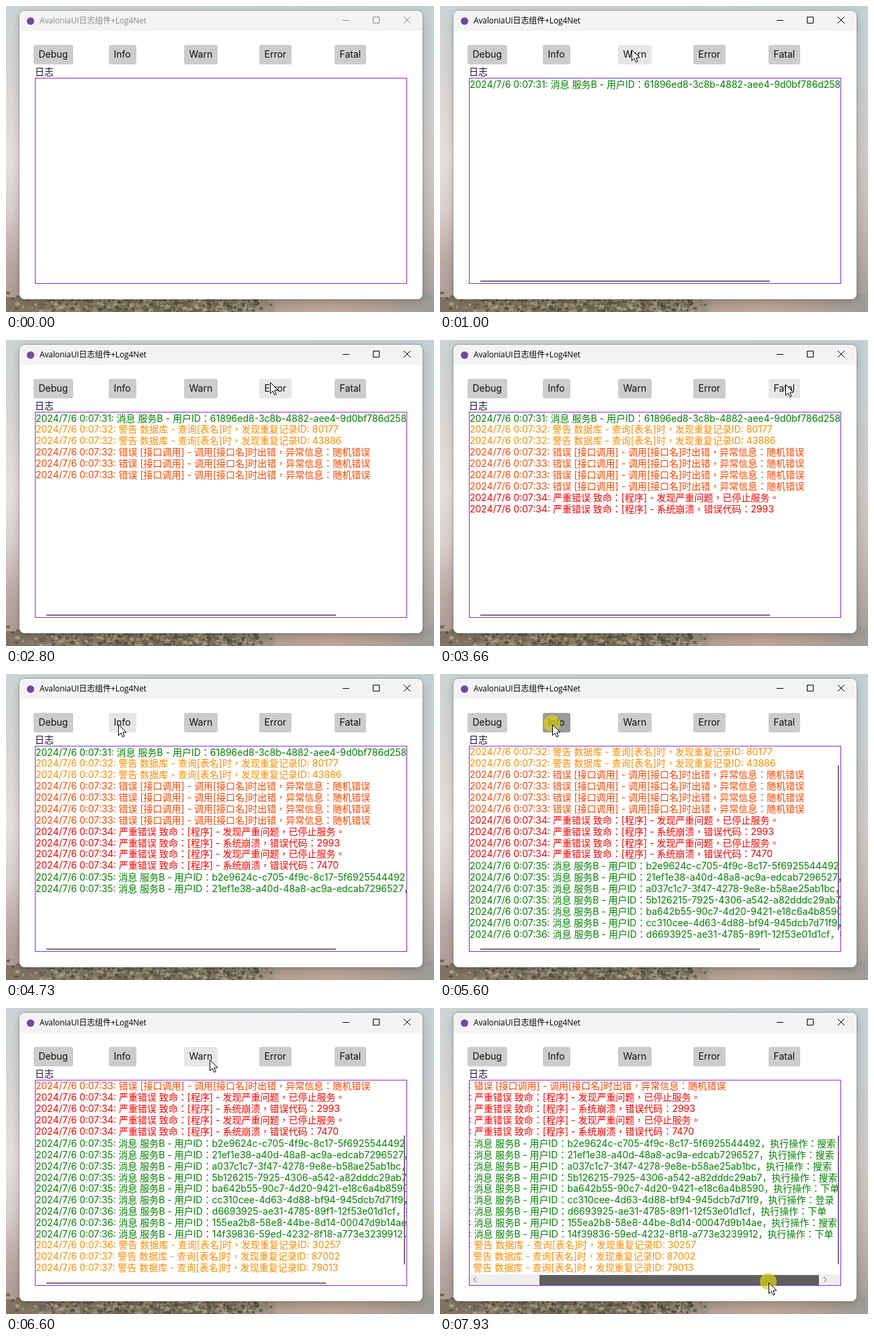
These frames come from a looping animation (637 by 456 pixels, 8 s). An HTML page with a canvas:

```html
<!DOCTYPE html>
<html lang="zh-Hans">
<head>
<meta charset="utf-8">
<title>AvaloniaUI日志组件+Log4Net</title>
<style>
html, body { margin: 0; width: 100%; height: 100%; overflow: hidden; }
#stage {
  position: relative; width: 637px; height: 456px; overflow: hidden;
  font: 14px/16.94px Inter, "Noto Sans CJK TC", "Noto Sans CJK SC", sans-serif;
}
#stage * { box-sizing: border-box; }
#stage > *, #log > * { position: absolute; }
#window {
  left: 20px; top: 7px; width: 600px; height: 430px; border-radius: 8px;
  background: linear-gradient(#f3f3f3 30px, #fff 30px);
  box-shadow: 0 0 0 1px rgba(90, 90, 90, .35), 0 4px 14px rgba(0, 0, 0, .22);
}
#icon { left: 30.5px; top: 16.5px; width: 11px; height: 11px; border-radius: 50%; background: #6b4c9a; }
#title {
  left: 50px; top: 13px; white-space: nowrap;
  font: 12px/17px "Open Sans", "Noto Sans CJK SC", sans-serif; letter-spacing: -.12px;
}
#title, #controls { color: #000; }
.inactive #title, .inactive #controls { color: #8a8a8a; }
#controls { left: 500px; top: 15px; fill: none; stroke: currentColor; }
.button {
  top: 57.5px; height: 29px; padding: 6px 8px; border-radius: 3px;
  background: #ccc; color: #111; white-space: nowrap;
}
.button.hover { background: #e6e6e6; }
.button.pressed { background: #999; }
#label { left: 43px; top: 90px; color: #1c1030; }
#frame { left: 43px; top: 107px; width: 554px; height: 307px; border: 1px solid #8a2be2; }
#log { left: 44px; top: 108px; width: 552px; height: 305px; overflow: hidden; }
.row { left: 0; top: 0; white-space: pre; }
.info { color: #008000; }
.warn { color: #ff8c00; }
.error { color: #ff4500; }
.fatal { color: #f00; }
.low { font-family: "Noto Sans CJK SC", sans-serif; }
#track { left: 0; top: 289px; width: 552px; height: 16px; background: #eee; }
#track svg { position: absolute; left: 0; top: 0; fill: none; stroke: #666; }
.thumb { background: #757575; }
#spot {
  width: 25px; height: 25px; margin: -14px 0 0 -13px; border-radius: 50%;
  left: 0; top: 0; background: rgba(220, 208, 25, .72);
}
#cursor { left: 0; top: 0; overflow: visible; }
</style>
</head>
<body>
<div id="stage">
  <canvas id="wallpaper" width="637" height="456"></canvas>
  <div id="window"></div>
  <div id="icon"></div>
  <div id="title">AvaloniaUI日志组件+Log4Net</div>
  <svg id="controls" width="104" height="14">
    <path d="M1 6.5H11M46.5 1.5h9v9h-9zM92 1L102 11M102 1L92 11"/>
  </svg>
  <div id="label">日志</div>
  <div id="frame"></div>
  <div id="log" lang="zh-Hant-TW">
    <div id="track"><svg width="552" height="16"><path d="M10 4L6 8l4 4M527 4l4 4-4 4"/></svg></div>
    <div id="horizontal" class="thumb"></div>
    <div id="vertical" class="thumb"></div>
  </div>
  <div id="spot"></div>
  <svg id="cursor" width="13" height="20">
    <path d="M.5.5V16.6L4.2 13 6.7 18.8 9.2 17.7 6.8 12H12Z" fill="#fff" stroke="#000"/>
  </svg>
</div>
<script>
const LOOP = 8000, FRAME = 1000 / 15, ROW = 16.94, VISIBLE_ROWS = 17;
const $ = id => document.getElementById(id);
const stage = $('stage'), log = $('log');

const buttons = ['Debug', 'Info', 'Warn', 'Error', 'Fatal'].map((name, i) => {
  const el = document.createElement('div');
  el.className = 'button';
  el.textContent = name;
  el.style.left = 40.5 + 112 * i + 'px';
  stage.insertBefore(el, $('label'));
  return el;
});

const user = (id, action) =>
  `消息 服务B - 用户ID：${id}<span class="low" lang="zh-Hans">，</span>执行操作：${action}`;
const duplicate = id => `警告 数据库 - 查询[表名]时，发现重复记录ID: ${id}`;
const failure = '错误 [接口调用] - 调用[接口名]时出错，异常信息：随机错误';
const stopped = '严重错误 致命：[程序] - 发现严重问题，已停止服务。';
const crash = code => `严重错误 致命：[程序] - 系统崩溃，错误代码：${code}`;

// [press, release, level, second, message]
const clicks = [
  [467, 533, 'info', 31, user('61896ed8-3c8b-4882-aee4-9d0bf786d258', '登录')],
  [1467, 1533, 'warn', 32, duplicate(80177)],
  [1667, 1733, 'warn', 32, duplicate(43886)],
  [2200, 2267, 'error', 32, failure],
  [2467, 2533, 'error', 33, failure],
  [2667, 2733, 'error', 33, failure],
  [2867, 2933, 'error', 33, failure],
  [3400, 3467, 'fatal', 34, stopped],
  [3600, 3667, 'fatal', 34, crash(2993)],
  [3800, 3867, 'fatal', 34, stopped],
  [4000, 4067, 'fatal', 34, crash(7470)],
  [4467, 4533, 'info', 35, user('b2e9624c-c705-4f9c-8c17-5f6925544492', '搜索')],
  [4600, 4667, 'info', 35, user('21ef1e38-a40d-48a8-ac9a-edcab7296527', '搜索')],
  [4800, 4867, 'info', 35, user('a037c1c7-3f47-4278-9e8e-b58ae25ab1bc', '搜索')],
  [4933, 5000, 'info', 35, user('5b126215-7925-4306-a542-a82dddc29ab7', '搜索')],
  [5067, 5200, 'info', 35, user('ba642b55-90c7-4d20-9421-e18c6a4b8590', '下单')],
  [5267, 5333, 'info', 35, user('cc310cee-4d63-4d88-bf94-945dcb7d71f9', '登录')],
  [5400, 5467, 'info', 36, user('d6693925-ae31-4785-89f1-12f53e01d1cf', '下单')],
  [5533, 5667, 'info', 36, user('155ea2b8-58e8-44be-8d14-00047d9b14ae', '搜索')],
  [5733, 5800, 'info', 36, user('14f39836-59ed-4232-8f18-a773e3239912', '下单')],
  [6200, 6267, 'warn', 36, duplicate(30257)],
  [6400, 6467, 'warn', 37, duplicate(87002)],
  [6533, 6600, 'warn', 37, duplicate(79013)],
].map(([press, release, level, second, message]) => {
  const el = document.createElement('div');
  el.className = 'row ' + level;
  el.innerHTML = `2024/7/6 0:07:${second}: ${message}`;
  log.insertBefore(el, $('track'));
  return { press, release, el };
});

// [time, x, y] of the pointer tip
const path = [
  [0, 215, 470], [67, 210, 450], [400, 172, 70], [600, 172, 70],
  [867, 280, 63], [1067, 287, 65], [1800, 287, 65], [2067, 393, 63],
  [2933, 393, 63], [3133, 518, 61], [3200, 514, 66], [4067, 514, 66],
  [4400, 167, 75], [5867, 167, 75], [6133, 303, 77], [6667, 303, 77],
  [7067, 369, 433], [7133, 370, 421], [7333, 368, 413],
  [7533, 368, 413], [7600, 401, 410], [7733, 401, 409], [7933, 489, 409],
];

function pointer(t) {
  const next = path.findIndex(p => p[0] > t);
  if (next < 0) return path[path.length - 1].slice(1);
  const [t0, x0, y0] = path[next - 1], [t1, x1, y1] = path[next];
  const k = (t - t0) / (t1 - t0), e = k * k * (3 - 2 * k);
  return [x0 + (x1 - x0) * e, y0 + (y1 - y0) * e];
}

function place(el, left, top, width, height) {
  Object.assign(el.style, { left: left + 'px', top: top + 'px', width: width + 'px', height: height + 'px' });
}
const show = (el, on) => { el.style.visibility = on ? 'visible' : 'hidden'; };
const move = (el, x, y) => { el.style.transform = `translate(${x}px, ${y}px)`; };

function render(now) {
  const t = Math.floor((now % LOOP + 8) / FRAME) * FRAME + 3;
  const [x, y] = pointer(t).map(Math.round);
  const dragging = t >= 7800;
  const clicking = clicks.some(c => t >= c.press && t < c.release);
  const count = clicks.filter(c => t >= c.release).length;
  const overflow = count > VISIBLE_ROWS;

  stage.classList.toggle('inactive', t < 467);
  buttons.forEach(b => {
    const over = x >= b.offsetLeft && x < b.offsetLeft + b.offsetWidth && y >= 58 && y < 87;
    b.classList.toggle('hover', over && !clicking);
    b.classList.toggle('pressed', over && clicking);
  });

  const drag = dragging ? Math.min(88, Math.max(0, x - 401)) : 0;
  const scrollX = Math.round(drag / 88 * 117);
  const scrollY = Math.max(0, count - VISIBLE_ROWS) * ROW;
  clicks.forEach((c, i) => {
    show(c.el, i < count);
    move(c.el, -scrollX, Math.round(i * ROW - scrollY));
  });

  const thickness = dragging ? 15 : t >= 7600 ? 4 : 2;
  show($('track'), dragging);
  show($('horizontal'), count > 0);
  place($('horizontal'), 16 + drag, dragging ? 290 : 301, overflow ? 416 : 431, thickness);
  $('horizontal').style.background = dragging ? '#5e5e5e' : '';
  const length = Math.round(260 * VISIBLE_ROWS / Math.max(count, 1));
  show($('vertical'), overflow);
  place($('vertical'), 548, 274 - length, 2, length);

  show($('spot'), clicking || dragging);
  move($('spot'), x, y);
  show($('cursor'), t >= 67);
  move($('cursor'), x, y);
  requestAnimationFrame(render);
}

function paintWallpaper() {
  const g = $('wallpaper').getContext('2d');
  let seed = 7;
  const random = () => (seed = seed * 16807 % 2147483647) / 2147483647;
  const fill = (colors, x, y, w, h, across) => {
    const grad = g.createLinearGradient(x, y, across ? x + w : x, across ? y : y + h);
    colors.forEach((c, i) => grad.addColorStop(i / (colors.length - 1), c));
    g.fillStyle = grad;
    g.fillRect(x, y, w, h);
  };
  fill(['#cdd3d4', '#d3d4d4', '#ddd8d6', '#e6dfdd', '#d9cfcc', '#bba9a4', '#a8968f'], 0, 0, 320, 456);
  fill(['#c3d0d3', '#c6cfd1', '#cbcccb', '#cfc8c5', '#c9bdb8', '#b6aaa5', '#a29a94'], 320, 0, 317, 456);
  fill(['#cdd3d4', '#c9d1d2', '#c3d0d3'], 0, 0, 637, 8, true);
  fill(['#a4988a', '#b5a092', '#bfa697', '#b3a196', '#9b9c98'], 330, 428, 307, 28, true);
  fill(['#7d735f', '#877c68', '#766e59', '#6b6752', '#a4988a'], 0, 434, 400, 22, true);

  const tones = ['#57533f', '#6c6550', '#82775f', '#978b75', '#a99c87'];
  for (let i = 0; i < 700; i++) {
    const x = 410 * Math.sqrt(random()) * random() ** .2, top = x < 22 ? 416 : 436;
    const y = top + random() * (456 - top);
    g.fillStyle = tones[Math.floor(random() * tones.length)];
    g.beginPath();
    g.ellipse(x, y, 1 + random() * 3, 1 + random() * 2, 0, 0, 7);
    g.fill();
  }
}

paintWallpaper();
requestAnimationFrame(render);
</script>
</body>
</html>
```
